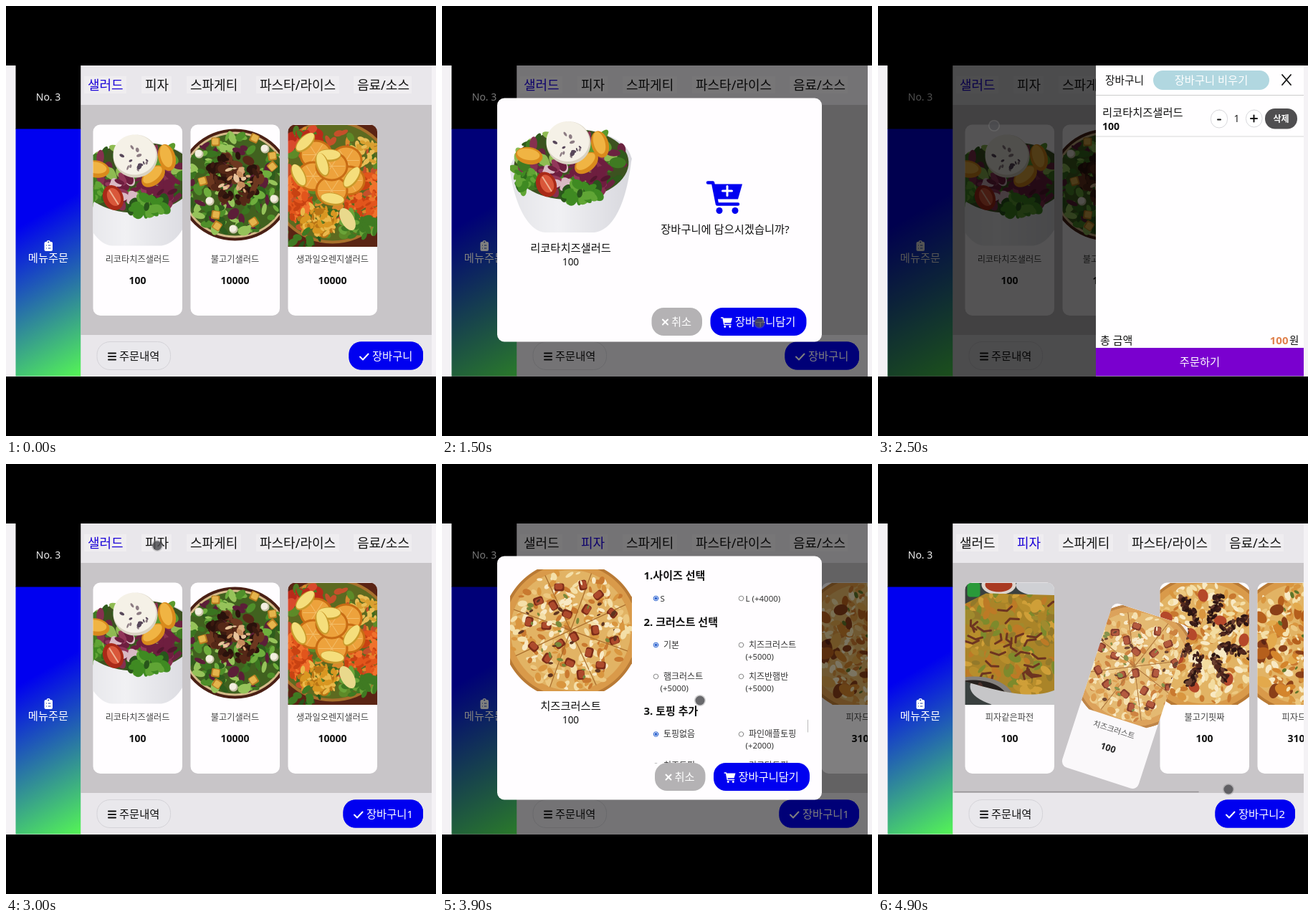
Write an HTML page with a canvas that moves like this. It is 600 px wide and 600 px high and loops after 5 s.

```html
<!DOCTYPE html>
<html lang="ko">
<head>
<meta charset="utf-8">
<title>메뉴 주문</title>
<style>
html, body { margin: 0; width: 100%; height: 100%; overflow: hidden; background: #000; }
canvas { display: block; width: 600px; height: 600px; }
</style>
</head>
<body>
<canvas id="stage" width="600" height="600"></canvas>
<script>
const stage = document.getElementById('stage').getContext('2d');
const FONT = '"Noto Sans", "Noto Sans CJK KR", "Noto Sans CJK", sans-serif';
const BLUE = '#0000f0', BAR = '#e9e7eb', TAU = Math.PI * 2;
let g = stage, seed = 1;

const rnd = () => (seed = seed * 16807 % 2147483647) / 2147483647;

// ---------- drawing helpers ----------
function box(x, y, w, h, r, fill, stroke) {
  g.beginPath();
  g.roundRect(x, y, w, h, r);
  if (fill) { g.fillStyle = fill; g.fill(); }
  if (stroke) { g.strokeStyle = stroke; g.lineWidth = 1; g.stroke(); }
}
function text(s, x, y, size, color = '#111', align = 'left', weight = 400) {
  g.font = `${weight} ${size}px ${FONT}`;
  g.textAlign = align;
  g.fillStyle = color;
  g.fillText(s, x, y);
}
function oval(x, y, rx, ry, fill, turn = 0) {
  g.beginPath();
  g.ellipse(x, y, rx, ry, turn, 0, TAU);
  g.fillStyle = fill;
  g.fill();
}
function line(color, width, ...p) {
  g.beginPath();
  for (let i = 0; i < p.length; i += 2) g.lineTo(p[i], p[i + 1]);
  g.strokeStyle = color;
  g.lineWidth = width;
  g.lineCap = g.lineJoin = 'round';
  g.stroke();
}
function scatter(n, x, y, rx, ry, size, ...colors) {
  for (let i = 0; i < n; i++) {
    const a = rnd() * TAU, d = Math.sqrt(rnd()), s = size * (.5 + rnd() * .5);
    oval(x + Math.cos(a) * d * rx, y + Math.sin(a) * d * ry, s, s * (.35 + rnd() * .4),
      colors[Math.floor(rnd() * colors.length)], rnd() * TAU);
  }
}
function each(points, draw) {
  for (let i = 0; i < points.length; i += 2) draw(points[i], points[i + 1], i);
}

// ---------- dishes, painted once on a 170 px square ----------
function dish(start, paint) {
  const c = document.createElement('canvas');
  c.width = c.height = 340;
  g = c.getContext('2d');
  g.scale(2, 2);
  seed = start;
  paint();
  g = stage;
  return c;
}
function pizzaBase() {
  oval(85, 85, 97, 97, '#b97a35');
  oval(85, 85, 93, 93, '#d99a4a');
  oval(85, 85, 84, 84, '#e2b364');
  scatter(260, 85, 85, 84, 84, 7, '#f4dfa8', '#edc880', '#d9963f', '#f8e9c4', '#c9792f');
}
function chunk(x, y, i) {
  g.save();
  g.translate(x, y);
  g.rotate(i * .7);
  box(-7, -5.5, 14, 11, 3, '#7c2c18');
  box(-6, -5, 11, 8, 3, '#ad4a2c');
  g.restore();
}

const ricotta = dish(11, () => {
  g.beginPath();
  g.moveTo(0, 78);
  g.bezierCurveTo(5, 125, 24, 168, 50, 169);
  g.lineTo(118, 169);
  g.bezierCurveTo(148, 165, 164, 120, 170, 66);
  g.bezierCurveTo(160, 15, 25, 5, 0, 78);
  const shade = g.createLinearGradient(0, 0, 170, 0);
  shade.addColorStop(0, '#e4e4e8');
  shade.addColorStop(.4, '#f1f1f4');
  shade.addColorStop(1, '#d8d8de');
  g.fillStyle = shade;
  g.fill();
  oval(86, 74, 80, 49, '#3c5220', -.05);
  scatter(120, 86, 74, 78, 48, 12, '#3f7a22', '#5c9a2e', '#2f5a1c', '#6b2340', '#86304f', '#8fbb52');
  scatter(22, 68, 88, 26, 16, 12, '#6e1e3f', '#92365a', '#d9b9c4');
  scatter(18, 120, 82, 28, 18, 12, '#6e1e3f', '#92365a', '#54162f');
  scatter(24, 25, 96, 20, 16, 10, '#3f8a22', '#60a535', '#2d6a1c');
  scatter(26, 98, 112, 30, 12, 11, '#3f8a22', '#60a535', '#28551b');
  each([107, 72, 126, 46, 27, 62], (x, y, i) => {
    oval(x, y, 19, 12, '#d98a1c', -.7 + i);
    oval(x - 1, y - 2, 16, 8, '#f0b443', -.7 + i);
  });
  oval(51, 102, 14, 18, '#a92a18', -.4);
  oval(52, 101, 9, 13, '#d9573a', -.4);
  line('#efb293', 2, 46, 92, 58, 111);
  oval(82, 44, 31, 30, '#d9d2c2');
  oval(81, 42, 30, 28, '#f5f1e7');
  scatter(13, 84, 44, 22, 20, 4, '#57475a', '#8c7c83');
});

const bulgogi = dish(29, () => {
  oval(85, 84, 80, 78, '#4a2015');
  oval(85, 84, 76, 74, '#d6bb8a');
  oval(85, 84, 73, 71, '#41611f');
  scatter(170, 85, 84, 71, 69, 10, '#4f8f2a', '#6fae3d', '#2e5c1c', '#96c35a', '#5c1e38', '#3a7420');
  scatter(95, 84, 76, 37, 34, 9, '#3b1a10', '#552817', '#6d3820', '#2a120c');
  scatter(24, 86, 78, 22, 20, 6, '#d9a878', '#c58c5c', '#e8c49c');
  each([58, 24, 112, 19, 137, 58, 40, 79, 58, 126, 60, 141, 111, 136, 137, 44], (x, y, i) => {
    g.save();
    g.translate(x, y);
    g.rotate(i);
    box(-6, -6, 12, 12, 2, '#b97d20');
    box(-5, -5, 9, 9, 2, '#e5b44c');
    g.restore();
  });
  each([35, 41, 127, 34, 140, 104, 50, 107, 83, 146], (x, y) => {
    oval(x, y, 6, 6, '#c9c3a8');
    oval(x - 1, y - 1, 5, 5, '#f3efe0');
  });
});

const orange = dish(47, () => {
  box(0, 0, 170, 170, 0, '#5a2414');
  oval(85, 80, 88, 86, '#a8702c');
  oval(85, 80, 84, 82, '#5d6a20');
  scatter(120, 85, 80, 78, 78, 10, '#5d8a28', '#3f6a1c', '#c5502a', '#d98a2c');
  scatter(110, 130, 100, 28, 32, 8, '#e2551c', '#f0722c', '#c84212');
  scatter(80, 36, 100, 20, 36, 8, '#e2551c', '#f0722c', '#c84212');
  scatter(22, 44, 20, 24, 18, 12, '#b92a1a', '#d94a2c', '#4d7a22');
  scatter(35, 130, 38, 20, 20, 6, '#d9a030', '#e8bd55');
  scatter(28, 122, 140, 28, 18, 10, '#3f7a22', '#6aa338');
  each([62, 42, 104, 50, 58, 72, 108, 78, 84, 92, 84, 58], (x, y) => {
    oval(x, y, 23, 21, '#c86c14');
    oval(x, y, 20, 18, '#eda23c');
    for (let k = 0; k < 6; k++)
      line('#f3bd68', 1, x, y, x + 18 * Math.cos(k * TAU / 6), y + 16 * Math.sin(k * TAU / 6));
  });
  scatter(75, 66, 134, 28, 22, 7, '#d99722', '#eab84a', '#b97515');
  each([80, 42, 38, 70, 112, 73, 85, 103, 71, 55, 47, 24], (x, y, i) => {
    oval(x, y + 1, 17, 9, '#c99a2c', i * .55);
    oval(x, y, 16, 7, '#f5de7c', i * .55);
  });
  oval(106, 132, 9, 17, '#e9d98c', -.5);
  scatter(18, 40, 158, 30, 12, 8, '#3f7a22', '#27521a');
});

const pancake = dish(61, () => {
  box(0, 0, 170, 170, 0, '#39403f');
  box(26, 0, 18, 20, 4, '#2a9a3a');
  oval(70, 3, 24, 14, '#ddd4cc');
  oval(70, 3, 19, 10, '#a93a22');
  oval(132, 4, 38, 15, '#cfd0d4');
  oval(110, 145, 80, 32, '#c6c6c8');
  g.beginPath();
  g.moveTo(10, 36);
  g.lineTo(52, 15);
  g.lineTo(165, 18);
  g.lineTo(165, 140);
  g.bezierCurveTo(130, 168, 80, 155, 10, 134);
  g.fillStyle = '#aa8428';
  g.fill();
  g.clip();
  scatter(220, 85, 85, 82, 76, 10, '#b88e2c', '#cf9f38', '#93792a', '#7d8a2c', '#bd7a26', '#a08a2e');
  for (let i = 0; i < 26; i++) {
    const x = 25 + rnd() * 120, y = 30 + rnd() * 105, a = rnd() * TAU;
    line('#6d3420', 3, x, y, x + 10 * Math.cos(a), y + 8 * Math.sin(a), x + 20 * Math.cos(a + .5), y + 14 * Math.sin(a + .5));
  }
  oval(36, 164, 55, 33, '#85817d');
  oval(34, 166, 50, 30, '#26211f');
  scatter(18, 40, 160, 28, 16, 9, '#4b302a', '#65463a');
});

const cheese = dish(83, () => {
  pizzaBase();
  for (let i = 0; i < 4; i++) {
    const a = .35 + i * TAU / 8, x = 84 * Math.cos(a), y = 84 * Math.sin(a);
    line('#a86c2c', 1.2, 85 - x, 85 - y, 85 + x, 85 + y);
  }
  each([69, 25, 102, 22, 40, 44, 61, 50, 124, 36, 143, 61, 107, 56, 80, 62, 27, 73, 51, 79,
    119, 85, 146, 99, 90, 94, 70, 104, 33, 108, 52, 124, 84, 130, 111, 116, 127, 134, 99, 147], chunk);
  scatter(45, 85, 85, 70, 70, 5, '#f8e9c4', '#79883a', '#5f3420');
});

const beef = dish(97, () => {
  pizzaBase();
  scatter(60, 85, 85, 75, 75, 8, '#f8e9c4', '#f3dca0');
  each([67, 72, 107, 53, 32, 48, 140, 80, 118, 135, 49, 105, 83, 18, 70, 145], (x, y) => oval(x, y, 9, 7, '#b5482a', x));
  for (let i = 0; i < 8; i++) {
    const a = .32 + i * TAU / 8;
    for (let d = 28; d < 70; d += 7)
      scatter(7, 85 + Math.cos(a) * d, 80 + Math.sin(a) * d, 7, 7, 5, '#3a1c18', '#52281e', '#2b1412', '#6b4030');
  }
});

const potato = dish(113, () => {
  pizzaBase();
  scatter(70, 85, 85, 78, 78, 12, '#b55f1c', '#d4852c', '#8a3f18', '#e3a94c');
  scatter(30, 85, 85, 74, 74, 5, '#5e7428', '#f6e2ae', '#5d2514');
});

const salads = [['리코타치즈샐러드', '100', ricotta], ['불고기샐러드', '10000', bulgogi], ['생과일오렌지샐러드', '10000', orange]];
const pizzas = [['피자같은파전', '100', pancake], ['치즈크러스트', '100', cheese], ['불고기핏짜', '100', beef], ['피자드치즈', '31000', potato]];
const tabs = [['샐러드', 114, 50], ['피자', 194, 33], ['스파게티', 257, 67], ['파스타/라이스', 354, 107], ['음료/소스', 490, 72]];

// ---------- icons ----------
function cartIcon(x, y, s, color, plus) {
  g.save();
  g.translate(x, y);
  g.scale(s, s);
  line(color, 4.5, 2, 3, 9, 3, 15, 33, 44, 33);
  g.beginPath();
  g.moveTo(10, 5);
  g.lineTo(50, 5);
  g.lineTo(44, 26);
  g.lineTo(14, 26);
  g.fillStyle = color;
  g.fill();
  oval(18, 42, 4.5, 4.5, color);
  oval(40, 42, 4.5, 4.5, color);
  if (plus) {
    line('#fff', 3, 29, 8, 29, 21);
    line('#fff', 3, 22.5, 14.5, 35.5, 14.5);
  }
  g.restore();
}
function clipboard() {
  box(53.5, 329, 11.5, 13, 2, '#fff');
  oval(59.2, 329, 2.6, 2, '#fff');
  oval(59.2, 329.5, 1, 1, '#24a');
  for (const y of [334, 338]) {
    line('#24a', 1, 56, y, 56.4, y);
    line('#24a', 1, 59, y, 62, y);
  }
}

// ---------- page ----------
function card([name, price, pic], x) {
  g.save();
  box(x, 165.5, 124.5, 266.5, 10, '#fffdff');
  g.clip();
  g.drawImage(pic, x - 23, 165.5, 170, 170);
  g.restore();
  text(name, x + 62, 358, 12.2, '#444', 'center');
  text(price, x + 62, 388, 14, '#111', 'center', 700);
}
function flyCard(item, x, p) {
  const cx = x + 62, cy = 299;
  g.save();
  g.globalAlpha = 1 - p * .9;
  g.translate(cx + 250 * p, cy + 250 * p);
  g.rotate(Math.PI * p);
  g.scale(1 - p, 1 - p);
  g.translate(-cx, -cy);
  card(item, x);
  g.restore();
}
function page(tab, count, flying, p) {
  box(0, 83, 600, 434, 0, '#f4f2f5');
  box(13.5, 83, 91, 89, 0, '#000');
  text('No. 3', 59, 132, 14, '#eee', 'center');
  const mix = g.createLinearGradient(0, 0, 172, 298);
  const fade = g.createLinearGradient(-27, 195, 145, 493);
  fade.addColorStop(.35, BLUE);
  fade.addColorStop(1, '#55f555');
  box(13.5, 171.5, 91, 345, 0, fade);
  clipboard();
  text('메뉴주문', 59, 356.5, 15.3, '#fff', 'center');

  box(104.5, 83, 489.5, 55, 0, BAR);
  tabs.forEach(([name, x, w], i) => {
    box(x - 5, 98, w + 9, 24, 0, '#efedf0');
    text(name, x, 117, 18, i === tab ? '#1a00d8' : '#111');
  });
  box(104.5, 138, 489.5, 321, 0, '#c8c5c8');
  box(104.5, 459, 489.5, 57, 0, BAR);

  g.save();
  g.beginPath();
  g.rect(104, 83, 490, 433);
  g.clip();
  const items = tab ? pizzas : salads;
  if (tab) line('#969396', 1.5, 107, 457.5, 447, 457.5);
  items.forEach((item, i) => { if (i !== flying) card(item, 121.5 + i * 136); });
  if (flying >= 0) flyCard(items[flying], 121.5 + flying * 136, p);
  g.restore();

  box(127, 468.5, 102.5, 39, 18, '#e9e8ec', '#d4d3d8');
  for (const y of [484.5, 489, 493.5]) line('#111', 2, 143, y, 153, y);
  text('주문내역', 158, 494, 15.3);
  const x = count ? 503 : 511;
  box(x - 32.5, 468.5, 614.5 - x - (count ? 0 : 0), 39, 17, BLUE);
  box(582, 466, 12, 44, 0, BAR);
  box(x - 32.5, 468.5, 582 - x + 32.5, 39, 17, BLUE);
  line('#fff', 2, x - 17, 489.5, x - 13, 493.5, x - 5.5, 485.5);
  text('장바구니' + (count || ''), x, 494, 15.3, '#fff');
}
const dim = a => box(13.5, 83, 580.5, 434, 0, `rgba(0,0,0,${a})`);

// ---------- dialogs ----------
function dialog([name, price, pic], dx, dy) {
  dim(.5);
  box(77, 128.5, 453, 340, 10, '#fffdff');
  g.drawImage(pic, 94.5, 147, 170, 170);
  text(name, 179.5, 342.5, 15.3, '#111', 'center');
  text(price, 179.5, 361.5, 13.5, '#111', 'center');
  if (dx) options(); else {
    cartIcon(369, 243.5, 1, BLUE, true);
    text('장바구니에 담으시겠습니까?', 395, 317, 15.3, '#111', 'center');
  }
  g.save();
  g.translate(dx, dy);
  box(292.5, 421, 70.5, 39, 17, '#b4b2b4');
  line('#fff', 2, 308, 437.5, 315, 444.5);
  line('#fff', 2, 315, 437.5, 308, 444.5);
  text('취소', 320, 446, 15.3, '#fff');
  box(374.5, 421, 134, 39, 17, BLUE);
  cartIcon(389, 434, .32, '#fff');
  text('장바구니담기', 409, 446, 15.3, '#fff');
  g.restore();
}
function choice(x, y, label, extra, on) {
  g.beginPath();
  g.arc(x, y - 4, 3.3, 0, TAU);
  g.strokeStyle = on ? '#2a62d0' : '#888';
  g.lineWidth = 1;
  g.stroke();
  if (on) oval(x, y - 4, 2, 2, '#2a62d0');
  const latin = label < 'a';
  text(label, x + (latin ? 6 : 10.5), y, latin ? 11.5 : 12, '#333');
  if (extra) text(extra, x + 6, y + 16, 11.4, '#333');
}
function options() {
  g.save();
  g.beginPath();
  g.rect(270, 130, 255, 288);
  g.clip();
  [['1.사이즈 선택', 161], ['2. 크러스트 선택', 226], ['3. 토핑 추가', 350]]
    .forEach(([s, y]) => text(s, 281.5, y, 15, '#111', 'left', 700));
  choice(298.5, 191.5, 'S', '', true);
  choice(417.5, 191.5, 'L (+4000)');
  choice(298.5, 256.5, '기본', '', true);
  choice(417.5, 256.5, '치즈크러스트', '(+5000)');
  choice(298.5, 300.5, '햄크러스트', '(+5000)');
  choice(417.5, 300.5, '치즈반햄반', '(+5000)');
  choice(298.5, 381, '토핑없음', '', true);
  choice(417.5, 381, '파인애플토핑', '(+2000)');
  choice(298.5, 425, '치즈토핑');
  choice(417.5, 425, '리코타토핑');
  g.restore();
  line('#bbb', 1, 510.5, 357, 510.5, 374);
}
function cartPanel(open) {
  dim(.67 * open);
  g.save();
  g.beginPath();
  g.rect(13, 83, 581, 433.5);
  g.clip();
  g.translate(290 * (1 - open), 0);
  box(304, 83, 290, 434, 0, '#fffeff');
  text('장바구니', 317, 109, 14.7);
  box(384, 90, 162, 27, 13.5, '#b1d7e0');
  text('장바구니 비우기', 465, 109, 15.3, '#fff', 'center');
  line('#111', 1.8, 564, 96, 576, 110);
  line('#111', 1.8, 576, 96, 564, 110);
  line('#ccc', 1, 304, 124.5, 594, 124.5);
  text('리코타치즈샐러드', 313, 154, 15.3);
  text('100', 313, 173, 14, '#111', 'left', 700);
  box(464.5, 145, 23, 25, 12, '#fff', '#d8d8dc');
  line('#111', 2, 474, 158.5, 478, 158.5);
  text('1', 500.5, 162, 14, '#222', 'center');
  box(513.5, 145, 22.5, 24, 12, '#fff', '#d8d8dc');
  line('#111', 2, 520, 157, 529, 157);
  line('#111', 2, 524.5, 152.5, 524.5, 161.5);
  box(540, 143, 45, 28.5, 14, '#4f4e50');
  text('삭제', 562.5, 161.5, 12, '#fff', 'center', 700);
  line('#d8d8d8', 1, 304, 182, 594, 182);
  text('총 금액', 310, 471.5, 15);
  text('100', 572.5, 471.5, 15, '#e0824e', 'right', 700);
  text('원', 574, 471.5, 14.5);
  box(304, 477, 290, 39.5, 0, '#7a00cf');
  text('주문하기', 449, 502, 15.3, '#fff', 'center');
  g.restore();
}

// ---------- pointer: strokes of [time, x, y] ----------
const strokes = [
  [[1000, 186, 262], [1100, 190, 270], [1500, 443, 442], [1700, 448, 446], [2100, 528, 490],
    [2200, 528, 490], [2500, 162, 167], [2700, 162, 167], [3000, 211, 114], [3200, 211, 114]],
  [[3600, 320, 272], [3900, 360, 330], [4400, 489, 458], [4900, 489, 454], [5000, 489, 454]]
];
function pointer(t) {
  for (const path of strokes)
    for (let i = 1; i < path.length; i++) {
      const [t0, x0, y0] = path[i - 1], [t1, x1, y1] = path[i];
      if (t < t0 || t >= t1) continue;
      const k = (t - t0) / (t1 - t0), x = x0 + (x1 - x0) * k, y = y0 + (y1 - y0) * k;
      oval(x, y, 8, 8, 'rgba(130,130,130,.35)');
      oval(x, y, 6.5, 6.5, 'rgba(70,70,74,.75)');
    }
}

const clamp = v => Math.max(0, Math.min(1, v));
function render(t) {
  g.fillStyle = '#000';
  g.fillRect(0, 0, 600, 600);
  const tab = t >= 3100 ? 1 : 0;
  const count = t >= 4900 ? 2 : t >= 1600 ? 1 : 0;
  const p = (t - (tab ? 4850 : 1550)) / 500;
  page(tab, count, p > 0 && p < 1 ? tab : -1, p);
  if (t >= 1100 && t < 1600) dialog(salads[0], 0, 0);
  if (t >= 3600 && t < 4900) dialog(pizzas[1], 4.5, -4);
  const open = clamp((t - 2100) / 200) * clamp((2800 - t) / 200);
  if (open > 0) cartPanel(open);
  pointer(t);
}
function tick() {
  render(Math.floor(performance.now() % 5000 / 100) * 100);
  requestAnimationFrame(tick);
}
tick();
</script>
</body>
</html>
```
